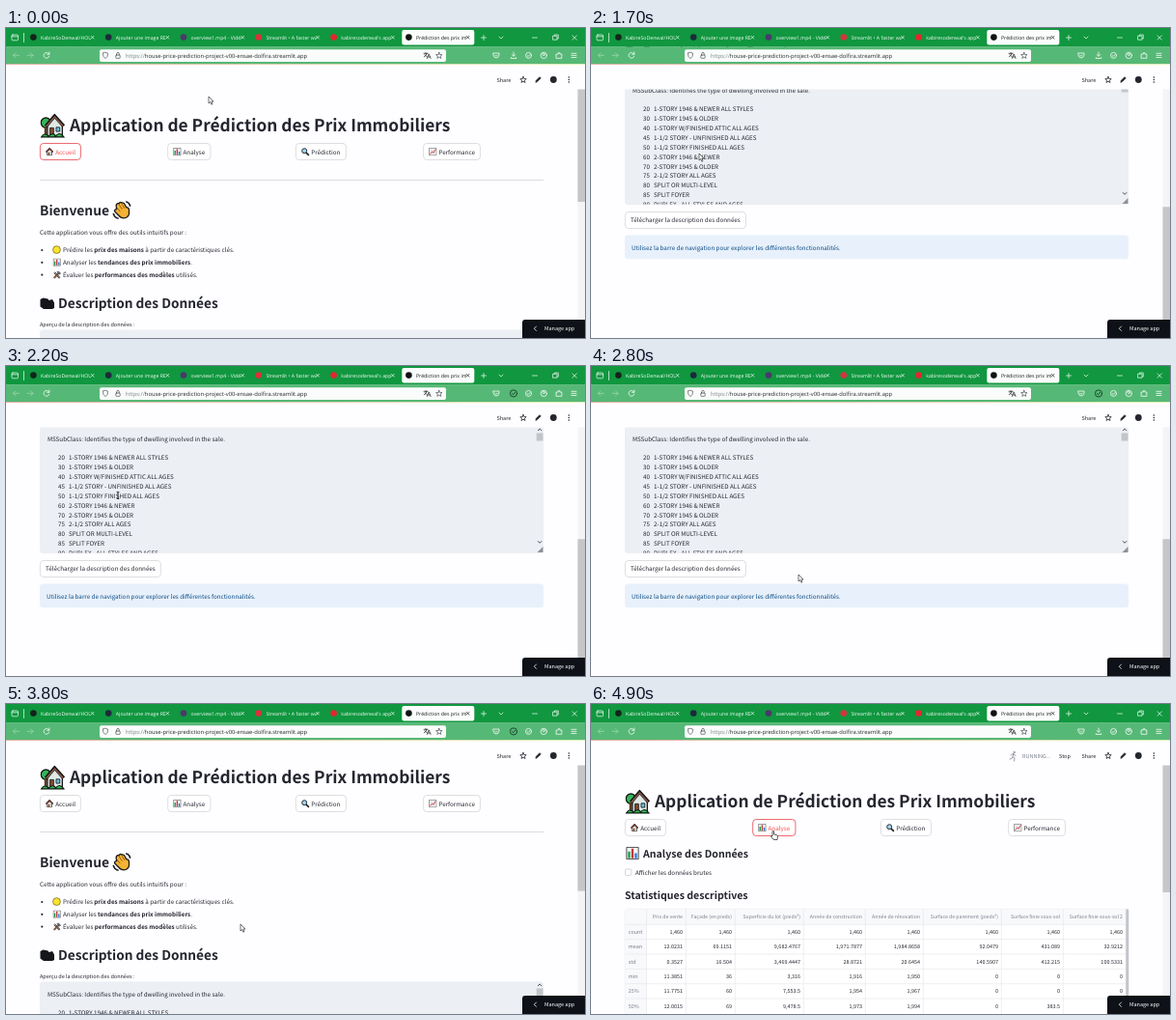
Animation, 600 px wide and 321 px high, one loop 5 s. Source, as an HTML page:

```html
<!DOCTYPE html>
<html lang="fr">
<head>
<meta charset="utf-8">
<title>Prédiction des prix immobiliers</title>
<style>
  @property --s { syntax: "<number>"; inherits: true; initial-value: 0; }
  html, body { margin: 0; width: 100%; height: 100%; overflow: hidden; background: #fefdff; }
  #stage { display: block; width: 600px; height: 321px; animation: scroll 5s step-end infinite; }
  text {
    font: 6.27px "Noto Sans CJK JP", "Noto Sans CJK SC", "Noto Sans CJK", "Open Sans", sans-serif;
    fill: #24262f; white-space: pre; text-rendering: geometricPrecision;
  }
  .h1 { font-size: 17.33px; font-weight: 700; }
  .h2 { font-size: 13.8px; font-weight: 700; }
  .h3 { font-size: 10.6px; font-weight: 700; }
  .small { font-size: 5.5px; }
  .cell { font-size: 5.45px; }
  .head { font-size: 5.2px; }
  .dim { fill: #7b7f8d; }
  .end { text-anchor: end; }
  .ui { font-family: "Open Sans", "Noto Sans", sans-serif; font-size: 5.2px; fill: #f4fbf6; }
  .url { font-size: 5.82px; fill: #25282c; }
  .line { fill: none; stroke: #24262f; stroke-width: .8; stroke-linecap: round; stroke-linejoin: round; }
  .pale { stroke: #f6fcf8; }
  .faint { stroke: #9bd6ae; }
  .dark { stroke: #10301d; }
  .btn { color: #24262f; stroke: #d6d6da; }
  .btn rect { fill: #fff; stroke-width: .8; }
  .btn text { fill: currentColor; stroke: none; }
  .btn use { stroke: none; }

  #doc { transform: translateY(calc(var(--s) * -1px)); }
  #thumb { transform: translateY(calc(var(--s) * .545px)); }
  #b0 { animation: blur 5s step-end infinite; }
  #b1 { animation: hover 5s step-end infinite; }
  #home, #thumb { animation: home 5s step-end infinite; }
  #stats, #thumb2 { animation: stats 5s step-end infinite; }
  #grid { animation: grid 5s step-end infinite; }
  #run { animation: run 5s step-end infinite; }
  #save { animation: save 5s step-end infinite; }
  #done { animation: done 5s step-end infinite; }
  #mouse { animation: move 5s step-end infinite; }
  #arrow { animation: arrow 5s step-end infinite; }
  #beam { animation: beam 5s step-end infinite; }
  #hand { animation: hand 5s step-end infinite; }

  @keyframes scroll {
    0% { --s: 0; } 30% { --s: 90; } 32% { --s: 200; } 34% { --s: 261; }
    40% { --s: 256; } 42% { --s: 250; }
    62% { --s: 235; } 64% { --s: 160; } 66% { --s: 74; }
    74% { --s: 55; } 76% { --s: 25; } 78% { --s: 5; } 80%, 100% { --s: 0; }
  }
  @keyframes move {
    0% { transform: translate(210px, 71px); }
    12% { transform: translate(205px, 74px); }
    14% { transform: translate(190px, 83px); }
    16% { transform: translate(160px, 97px); }
    18% { transform: translate(120px, 114px); }
    20% { transform: translate(92px, 125px); }
    22% { transform: translate(88px, 129px); }
    24% { transform: translate(106px, 130px); }
    26% { transform: translate(112px, 130px); }
    40% { transform: translate(114px, 132px); }
    42% { transform: translate(116px, 134px); }
    52% { transform: translate(140px, 152px); }
    54% { transform: translate(180px, 184px); }
    56% { transform: translate(215px, 216px); }
    58% { transform: translate(238px, 236px); }
    60% { transform: translate(248px, 243px); }
    76% { transform: translate(243px, 228px); }
    78% { transform: translate(225px, 195px); }
    80% { transform: translate(201px, 161px); }
    82% { transform: translate(189px, 143px); }
    84% { transform: translate(189px, 140px); }
    86%, 100% { transform: translate(188px, 131px); }
  }
  @keyframes arrow {
    0% { visibility: visible; } 36% { visibility: hidden; }
    56% { visibility: visible; } 86%, 100% { visibility: hidden; }
  }
  @keyframes beam {
    0% { visibility: hidden; } 36% { visibility: visible; } 56%, 100% { visibility: hidden; }
  }
  @keyframes hand { 0% { visibility: hidden; } 86%, 100% { visibility: visible; } }
  @keyframes blur {
    0% { color: #ff4b4b; stroke: #e8474f; } 52%, 100% { color: #24262f; stroke: #d6d6da; }
  }
  @keyframes hover {
    0% { color: #24262f; stroke: #d6d6da; } 86%, 100% { color: #ff4b4b; stroke: #e8474f; }
  }
  @keyframes save {
    0% { visibility: visible; } 38% { visibility: hidden; } 78%, 100% { visibility: visible; }
  }
  @keyframes done {
    0% { visibility: hidden; } 38% { visibility: visible; } 78%, 100% { visibility: hidden; }
  }
  @keyframes run { 0% { visibility: hidden; } 90%, 100% { visibility: visible; } }
  @keyframes home { 0% { visibility: visible; } 94%, 100% { visibility: hidden; } }
  @keyframes stats { 0% { visibility: hidden; } 94%, 100% { visibility: visible; } }
  @keyframes grid { 0% { visibility: hidden; } 96%, 100% { visibility: visible; } }
</style>
</head>
<body>
<svg id="stage" viewBox="0 0 600 321">
  <defs>
    <symbol id="garden" viewBox="0 0 24 24">
      <circle cx="5.500" cy="9" r="4.800" fill="#35b45a" stroke="#0d1a12" stroke-width="1.300" />
      <path d="M4 13h2.500v9H4z" fill="#5a3a20" />
      <path d="M7 11l7-7.500 7.500 8V22H7z" fill="#dfe9e6" stroke="#14171a" stroke-width="1.200" />
      <path d="M5.500 12.500L14 2.500l8.800 9.800" fill="none" stroke="#14171a" stroke-width="3.400" />
      <path d="M6 12.500l8-9.200 8.200 9" fill="none" stroke="#8f5a48" stroke-width="1.400" />
      <path d="M9.500 14h3.500v8H9.500z" fill="#8a4a2c" stroke="#14171a" stroke-width=".8" />
      <path d="M15.500 13.500h3.500v4h-3.500z" fill="#6fc3e4" stroke="#14171a" stroke-width=".8" />
      <path d="M1 23q3-5 7-1 5-4 7 0 4-5 8 1z" fill="#36b552" stroke="#0d1a12" stroke-width="1.100" />
    </symbol>
    <symbol id="house" viewBox="0 0 24 24">
      <path d="M5 11l7-7 7 7v11H5z" fill="#f3eadb" stroke="#222" stroke-width="1.8" />
      <path d="M2 13L12 3l10 10" fill="none" stroke="#2a1a18" stroke-width="4.200" />
      <path d="M2.600 13L12 3.600l9.400 9.400" fill="none" stroke="#b5453a" stroke-width="1.800" />
      <path d="M8 14h4v8H8z" fill="#6e3a1a" /><path d="M14 14h3v4h-3z" fill="#4aa8dd" />
    </symbol>
    <symbol id="chart" viewBox="0 0 24 24">
      <path d="M1.500 1.500h21v21h-21z" fill="#f4f6f8" stroke="#333" stroke-width="1.500" />
      <path d="M4 9h4v12H4z" fill="#1f9d4d" /><path d="M10 4h4v17h-4z" fill="#c8383a" /><path d="M16 12h4v9h-4z" fill="#2b7fd0" />
    </symbol>
    <symbol id="trend" viewBox="0 0 24 24">
      <path d="M1.500 1.500h21v21h-21z" fill="#f7f7f8" stroke="#444" stroke-width="1.500" />
      <path d="M2 9h20M2 15h20M9 2v20M16 2v20" stroke="#b9c4cc" />
      <path d="M4 19l6-7 4 3 7-11" fill="none" stroke="#d92f2f" stroke-width="2.400" />
    </symbol>
    <symbol id="lens" viewBox="0 0 24 24">
      <path d="M14 14l8 8" stroke="#222" stroke-width="4.500" stroke-linecap="round" />
      <circle cx="9.500" cy="9.500" r="7" fill="#9fd4f3" stroke="#222" stroke-width="2.600" />
    </symbol>
    <symbol id="wave" viewBox="0 0 24 24">
      <path d="M5 6q1-3 3.500-2 1-2.500 3.500-1 3-.5 4 2.500l1.500 3q3 0 3.500 3v5.500q-1.500 5-6.500 5-4 0-6.500-3.500L3 13.500q0-2.500 2.500-2.500z" fill="#f5b335" stroke="#1c1c1c" stroke-width="1.600" />
      <path d="M17 1.500q4.500 1 5.500 6M1.500 16q1 5.500 6.500 6.500" fill="none" stroke="#1c1c1c" stroke-width="2" />
      <path d="M8.500 5l4 6M12 4l3.500 6M6 9l4 5" stroke="#7a4d0c" />
    </symbol>
    <symbol id="tools" viewBox="0 0 24 24">
      <path d="M5 5l15 16" stroke="#222" stroke-width="5" /><path d="M5 5l15 16" stroke="#9aa5ad" stroke-width="2.600" />
      <path d="M19 5L4 21" stroke="#222" stroke-width="5" /><path d="M17 7L4 21" stroke="#b5722f" stroke-width="2.800" />
      <path d="M12 3l5-1 6 6-3 3z" fill="#6b7780" stroke="#222" />
    </symbol>
    <path id="star" d="M0-3.200L.9-1 3.200-.9 1.400.6 2 2.900 0 1.600-2 2.900-1.400.6-3.200-.9-.9-1z" />
    <linearGradient id="strip"><stop stop-color="#ff4b4b" /><stop offset="1" stop-color="#fffd80" /></linearGradient>
  </defs>

  <rect width="600" height="321" fill="#fefdff" />

  <g id="doc">
    <use href="#garden" x="35.500" y="88.500" width="25.500" height="25.500" />
    <text class="h1" x="66" y="106.800">Application de Prédiction des Prix Immobiliers</text>
    <g id="nav"></g>

    <g id="home">
      <path d="M35 157.500h522" stroke="#dcdde1" />
      <text class="h2" x="35" y="194">Bienvenue</text>
      <use href="#wave" x="110" y="178.500" width="20" height="20" />
      <text x="35" y="213.800">Cette application vous offre des outils intuitifs pour :</text>
      <g fill="#24262f">
        <circle cx="37.300" cy="230" r="1.100" /><circle cx="37.300" cy="242.800" r="1.100" /><circle cx="37.300" cy="255.600" r="1.100" />
      </g>
      <circle cx="52.500" cy="229.600" r="3.900" fill="#fbe52c" stroke="#4a4413" stroke-width=".6" />
      <use href="#chart" x="48.500" y="238.400" width="8.400" height="8.400" />
      <use href="#tools" x="48.300" y="251.200" width="8.800" height="8.800" />
      <text x="59" y="232">Prédire les <tspan font-weight="700">prix des maisons</tspan> à partir de caractéristiques clés.</text>
      <text x="59" y="244.900">Analyser les <tspan font-weight="700">tendances des prix immobiliers</tspan>.</text>
      <text x="59" y="257.800">Évaluer les <tspan font-weight="700">performances des modèles</tspan> utilisés.</text>
      <path d="M35.500 281l3-1.500 5 1 1 1.500 3.500-1 2 3.500v5.500l-2 1h-9l-3.500-2.500z" fill="#14161b" />
      <text class="h2" x="54" y="289.800" style="font-size:13.680px">Description des Données</text>
      <text class="small" x="35" y="308.500">Aperçu de la description des données :</text>

      <rect x="35" y="312.600" width="522" height="131.500" rx="3.500" fill="#eceff4" />
      <svg y="313" width="549" height="130.500"><g id="lines"></g></svg>
      <path d="M551.300 316.800l1.800-1.800 1.800 1.800M551.300 431.500l1.800 1.800 1.800-1.800" class="line" />
      <rect x="549.700" y="319.500" width="6.800" height="8" fill="#c3c5c9" />
      <path d="M556.500 437v6h-6z" fill="#8f9197" />

      <g class="btn">
        <rect x="35.400" y="451.500" width="125" height="17" rx="3.500" />
        <text x="41" y="462.300">Télécharger la description des données</text>
      </g>
      <rect x="35" y="475.500" width="522" height="24.800" rx="3.500" fill="#e8f1fb" />
      <text x="42" y="490.700" style="fill:#0a4a84">Utilisez la barre de navigation pour explorer les différentes fonctionnalités.</text>
    </g>

    <g id="stats">
      <use href="#chart" x="36" y="147.500" width="14" height="14" />
      <text class="h3" x="54" y="159.200">Analyse des Données</text>
      <rect x="35.500" y="171" width="6.400" height="6.400" rx="1.500" fill="#fff" stroke="#c3c5cd" stroke-width=".7" />
      <text x="46" y="176.600">Afficher les données brutes</text>
      <text class="h3" x="35" y="202">Statistiques descriptives</text>
    </g>
    <g id="grid"></g>
  </g>

  <rect x="592.500" y="37" width="7.500" height="284" fill="#f4f4f5" />
  <rect id="thumb" x="592.500" y="43" width="7.500" height="137" fill="#c6c6c8" />
  <rect id="thumb2" x="592.500" y="43" width="7.500" height="152" fill="#c6c6c8" />

  <rect y="37" width="600" height="26.500" fill="#fefdff" />
  <rect y="37" width="600" height=".9" fill="url(#strip)" opacity=".5" />
  <g id="run">
    <g class="line" style="stroke:#83868f">
      <circle cx="438.500" cy="50" r=".7" /><path d="M438 51.500l-1 3 2 1.500-.5 3M437 54.500l-1 2-2 .5M435 53l2-1.500 3 2" />
    </g>
    <text class="small dim" x="447" y="55.600">RUNNING...</text>
    <text class="small" x="485" y="55.600">Stop</text>
  </g>
  <text class="small" x="508.500" y="55.600">Share</text>
  <use href="#star" x="536" y="53.600" class="line" />
  <path d="M549 56l.4-1.700 3.600-3.600 1.200 1.200-3.600 3.600z" class="line" style="fill:#24262f" />
  <circle cx="567.300" cy="53.500" r="3.400" fill="#24262e" />
  <g fill="#24262f"><circle cx="583.300" cy="51" r=".8" /><circle cx="583.300" cy="53.500" r=".8" /><circle cx="583.300" cy="56" r=".8" /></g>

  <rect width="600" height="19.500" fill="#10973f" />
  <rect y="19.300" width="600" height="17.900" fill="#56b876" />
  <rect x="410.300" y="2" width="75" height="15.600" rx="2" fill="#fbfdfc" />
  <g id="tabs"></g>
  <g class="line pale" style="stroke-width:.7">
    <rect x="6" y="7" width="6.500" height="5.800" rx="1" /><path d="M6 8.800h6.500M18.500 5.500v9" />
    <path d="M492.500 10h5M495 7.500v5M511 9l2 2 2-2M545.500 10h5M587 7.800l4.400 4.400M591.400 7.800L587 12.200" />
    <rect x="567" y="8.200" width="4" height="4" /><path d="M568.300 8v-1h4v4h-1" />
  </g>
  <g class="line faint"><path d="M7.500 28.300h6M7.500 28.300l2.500-2.500M7.500 28.300l2.500 2.500M22 28.300h6M28 28.300l-2.500-2.500M28 28.300l-2.500 2.500" /></g>
  <path class="line pale" d="M44.600 27a2.900 2.900 0 1 0 .2 2.200M44.900 25v2.300h-2.300" />
  <rect x="97" y="22.300" width="359" height="12.600" rx="2" fill="#f9fcfa" />
  <g class="line" style="stroke:#4c5057;stroke-width:.7">
    <path d="M103 25.300l2.600.9q.2 4-2.600 5.400-2.800-1.400-2.600-5.400z" />
    <rect x="113.800" y="28" width="4.400" height="3.300" rx=".6" /><path d="M114.700 28v-1.300a1.300 1.300 0 0 1 2.600 0V28" />
    <path d="M433 26.300h4M435 25.500v.8M436.300 26.300q-.7 2.400-3 3.500M433.800 27.600l2.400 2M436.300 31.500l1.900-4.600 1.900 4.600M437 30h2.400" style="stroke:#202226" />
    <use href="#star" x="448.800" y="28.500" />
  </g>
  <text class="ui url" x="124" y="30.600"><tspan fill="#7b8086">https://</tspan>house-price-prediction-project-v00-ensae-dolfira.streamlit.app</text>
  <g class="line pale">
    <path d="M505 26h6v2q-.5 3-3 3t-3-3zM506.700 28l1.300 1.300 1.300-1.300" />
    <path id="save" d="M526 25v4M524.200 27.500l1.800 1.800 1.800-1.800M523.300 30.500v1h5.400v-1" />
    <g id="done" class="dark"><circle cx="526" cy="28.400" r="3.600" /><path d="M524.400 28.500l1.200 1.200 2-2.400" /></g>
    <circle cx="541.500" cy="28.400" r="3" /><path d="M540 28.500l1.200 1 1.800-2" />
    <circle cx="557.300" cy="27.400" r="1.200" /><circle cx="557.300" cy="28.400" r="3.200" />
    <path d="M570.500 27h1.800v-1.300h1.600V27h2v4.300h-5.400z" />
    <path d="M586 26.300h5M586 28.400h5M586 30.500h5" />
  </g>

  <path d="M535 321v-16q0-3 3-3h62v19z" fill="#0e1117" />
  <path d="M549.500 309l-2.200 2.200 2.200 2.200" class="line" style="stroke:#fff" />
  <text class="small" x="558" y="313.300" style="fill:#fff" font-weight="700">Manage app</text>

  <g id="mouse">
    <path id="arrow" d="M0 0v7l1.600-1.400 1.200 2.600 1.200-.5-1.200-2.600H5z" fill="#fff" stroke="#111" stroke-width=".6" />
    <path id="beam" d="M-1.300-3.500h2.600M0-3.500v7M-1.300 3.500h2.600" fill="none" stroke="#111" stroke-width=".8" />
    <path id="hand" d="M0 .8Q.8-.6 1.600.8V4l3 .7q1.100.4.9 1.600L5 9.500H1.300L-1.600 6q.3-1.200 1.600-.3z" fill="#fff" stroke="#111" stroke-width=".7" />
  </g>
</svg>
<script>
  const fill = (id, parts) => { document.getElementById(id).innerHTML = parts.join(""); };
  const label = (x, y, str, cls = "", ink = "") =>
    `<text x="${x}" y="${y}" class="${cls}"${ink && ` style="fill:${ink}"`}>${str}</text>`;

  const tabs = [
    ["KabireSoDenwal/HOUSE", "#14241b"], ["Ajouter une image README", "#1d2a3a"],
    ["overview1.mp4 - Vidéo", "#4a3a6b"], ["Streamlit • A faster way", "#d8323c"],
    ["kabiresodenwal's apps", "#e5262f"], ["Prédiction des prix immo", "#111"]
  ];
  fill("tabs", tabs.map(([str, color], i) => {
    const x = 28.4 + i * 77.8, ink = i < 5 ? "#f4fbf6" : "#15181b";
    return `<circle cx="${x}" cy="9.600" r="3.300" fill="${color}"/>
      <svg x="${x + 7.6}" width="52" height="19">${label(0, 11.6, str, "ui", ink)}</svg>
      <path class="line" style="stroke:${ink};stroke-width:.7" d="M${x + 59.8} 8.300l2.800 2.800m0-2.800l-2.800 2.800"/>`;
  }));

  const buttons = [
    [35.4, 42, "house", "Accueil"], [167.7, 44.2, "chart", "Analyse"],
    [300.4, 52, "lens", "Prédiction"], [432.6, 58.8, "trend", "Performance"]
  ];
  fill("nav", buttons.map(([x, w, icon, str], i) => `<g class="btn" id="b${i}">
    <rect x="${x}" y="119.500" width="${w}" height="17" rx="3.500"/>
    <use href="#${icon}" x="${x + 5.4}" y="123.800" width="8.600" height="8.600"/>
    ${label(x + 15.8, 130.6, str)}</g>`));

  const types = [
    [20, "1-STORY 1946 &amp; NEWER ALL STYLES"], [30, "1-STORY 1945 &amp; OLDER"],
    [40, "1-STORY W/FINISHED ATTIC ALL AGES"], [45, "1-1/2 STORY - UNFINISHED ALL AGES"],
    [50, "1-1/2 STORY FINISHED ALL AGES"], [60, "2-STORY 1946 &amp; NEWER"],
    [70, "2-STORY 1945 &amp; OLDER"], [75, "2-1/2 STORY ALL AGES"],
    [80, "SPLIT OR MULTI-LEVEL"], [85, "SPLIT FOYER"], [90, "DUPLEX - ALL STYLES AND AGES"]
  ];
  fill("lines", [
    label(42.9, 14.6, "MSSubClass: Identifies the type of dwelling involved in the sale."),
    ...types.map(([n, str], i) => {
      const y = 34.3 + i * 9.87;
      return label(54, y, n) + label(65, y, str);
    })
  ]);

  const right = [95, 146, 217, 281, 341, 422, 486, 551];
  const heads = ["Prix de vente", "Façade (en pieds)", "Superficie du lot (pieds²)", "Année de construction",
    "Année de rénovation", "Surface de parement (pieds²)", "Surface finie sous-sol", "Surface finie sous-sol 2"];
  const rows = [
    "count" + " 1,460".repeat(8),
    "mean 12.0231 69.1151 9,682.4767 1,971.7877 1,984.8658 92.0479 431.089 32.9212",
    "std 0.3527 16.504 3,469.4447 28.8721 20.6454 140.5907 412.215 100.5331",
    "min 11.3851 36 3,316 1,916 1,950 0 0 0",
    "25% 11.7751 60 7,553.5 1,954 1,967 0 0 0",
    "50% 12.0015 69 9,478.5 1,973 1,994 0 383.5 0"
  ];
  const rule = d => `<path d="${d}" stroke="#e4e5ea" stroke-width=".6" fill="none"/>`;
  fill("grid", [
    `<rect x="35.300" y="212.300" width="522" height="130" rx="3" fill="#fff" stroke="#dfe0e6" stroke-width=".6"/>
     <rect x="35.600" y="212.600" width="518" height="15.700" fill="#f8f9fb"/>
     <rect x="35.600" y="228" width="22" height="100" fill="#f8f9fb"/>`,
    ...heads.map((str, i) => label(right[i], 222.2, str, "head dim end")),
    ...[57.5, ...right.map(x => x + 3.3)].map(x => rule(`M${x} 212.500v110`)),
    ...rows.map((row, r) => {
      const [name, ...vals] = row.split(" "), y = 238 + r * 15.35;
      return rule(`M35.500 ${y - 9.7}h518.500`) + label(38.8, y, name, "cell dim") +
        vals.map((v, i) => label(right[i], y, v, "cell end")).join("");
    }),
    `<rect x="554.300" y="212.500" width="2.700" height="110" fill="#c4c5ca"/>`
  ]);
</script>
</body>
</html>
```
